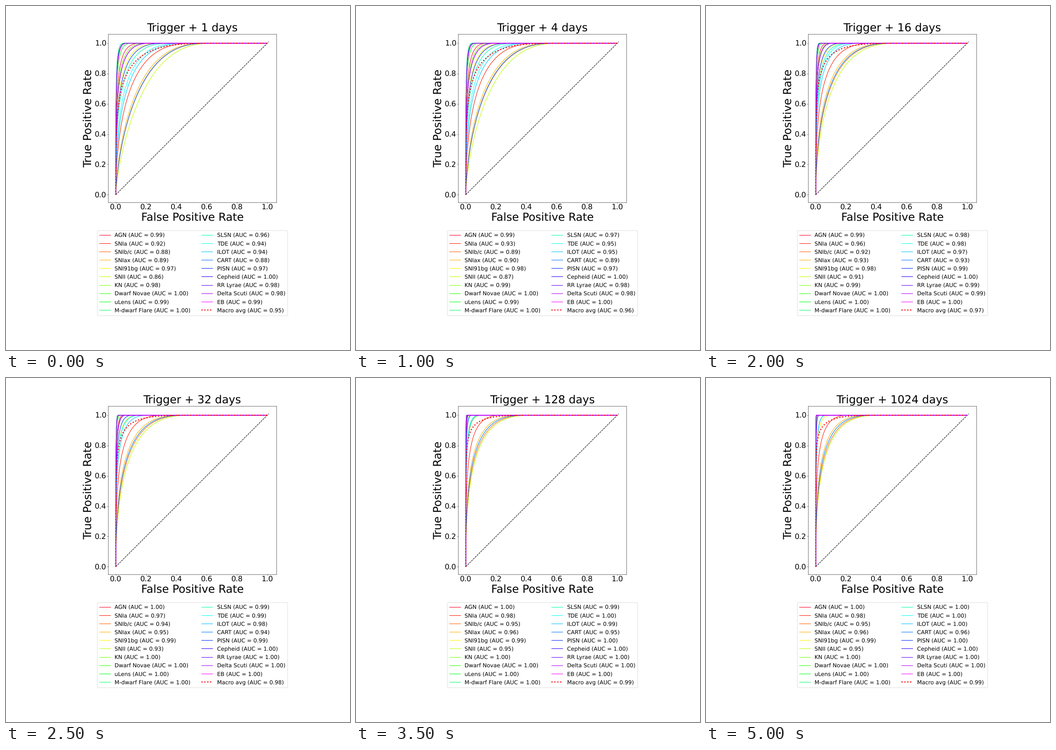
These frames come from a looping animation (748 px wide and 748 px high, 5.5 s). A matplotlib script:

```python
from math import exp, gamma

import matplotlib.pyplot as plt
import numpy as np
from matplotlib.animation import FuncAnimation

SIZE = 748
STEPS = 11
POWER = 2.4

# 1 - AUC on the first and the last day, in thousandths
CLASSES = {
    "AGN": (13, 1),
    "SNIa": (80, 19),
    "SNIb/c": (123.5, 47),
    "SNIax": (114, 37),
    "SNI91bg": (28, 7),
    "SNII": (144, 51),
    "KN": (17, 1),
    "Dwarf Novae": (4.5, 0.4),
    "uLens": (7.5, 0.5),
    "M-dwarf Flare": (3.5, 0.2),
    "SLSN": (40, 4.95),
    "TDE": (55.2, 0.5),
    "ILOT": (64.9, 4.9),
    "CART": (122, 42),
    "PISN": (32, 1.5),
    "Cepheid": (4.5, 0.2),
    "RR Lyrae": (20, 0.3),
    "Delta Scuti": (20, 0.4),
    "EB": (5.5, 0.2),
}

plt.rcParams.update({
    "font.family": "DejaVu Sans",
    "text.hinting": "none",
    "lines.linewidth": 1.35,
    "axes.linewidth": 0.7,
})


def gap_at(step, first, last):
    """Area still missing above a curve, easing from first to last."""
    return (last + (first - last) * exp(-(step / 4.2) ** 2.3)) / 1000


def roc(fpr, gap):
    """Curve that reaches 1 at a finite rate and leaves the given gap."""
    shape = 0.3 + 3.2 * gap
    unit = gamma(1 + 1 / shape) * gamma(1 + POWER) / gamma(1 + 1 / shape + POWER)
    return 1 - (1 - np.minimum(fpr * unit / gap, 1) ** shape) ** POWER


def label(name, gap):
    return f"{name} (AUC = {1 - gap:.2f})"


fig = plt.figure(figsize=(13, 13), dpi=SIZE / 13, facecolor="white")
ax = fig.add_axes([222 / SIZE, 321 / SIZE, 366 / SIZE, 366 / SIZE])

fpr = np.linspace(0, 1, 600) ** 3
cmap = plt.get_cmap("gist_rainbow")
names = [*CLASSES, "Macro avg"]
lines = [
    ax.plot(fpr, fpr, color=cmap(i / len(CLASSES)), label=label(name, 0))[0]
    for i, name in enumerate(CLASSES)
]
lines += ax.plot(fpr, fpr, "r:", lw=3, label=label("Macro avg", 0))
ax.plot([0, 1.01], [0, 1.01], "k--", zorder=1.5)

ticks = np.linspace(0, 1, 6)
limits = (-0.0505, 1.0605)
ax.set(xlim=limits, ylim=limits, xticks=ticks, yticks=ticks)
ax.tick_params(labelsize=20, length=2.5, pad=2)
ax.set_xlabel("False Positive Rate", fontsize=30, labelpad=2.5)
ax.set_ylabel("True Positive Rate", fontsize=30, labelpad=2.5)
title = ax.set_title("", fontsize=30, pad=7)
legend = ax.legend(
    handles=lines, loc="upper center", bbox_to_anchor=(0.5, -0.15),
    ncol=2, fontsize=15, labelspacing=0.545,
)


def update(step):
    gaps = [gap_at(step, *ends) for ends in CLASSES.values()]
    curves = [roc(fpr, gap) for gap in gaps]
    gaps.append(np.mean(gaps))
    curves.append(np.mean(curves, axis=0))

    title.set_text(f"Trigger + {2 ** step} days")
    texts = legend.get_texts()
    for name, gap, tpr, line, text in zip(names, gaps, curves, lines, texts):
        line.set_ydata(tpr)
        text.set_text(label(name, gap))
    return [title, *lines, *texts]


anim = FuncAnimation(
    fig, update, frames=STEPS, interval=500, repeat=True, repeat_delay=0, blit=False
)
plt.show()
```
